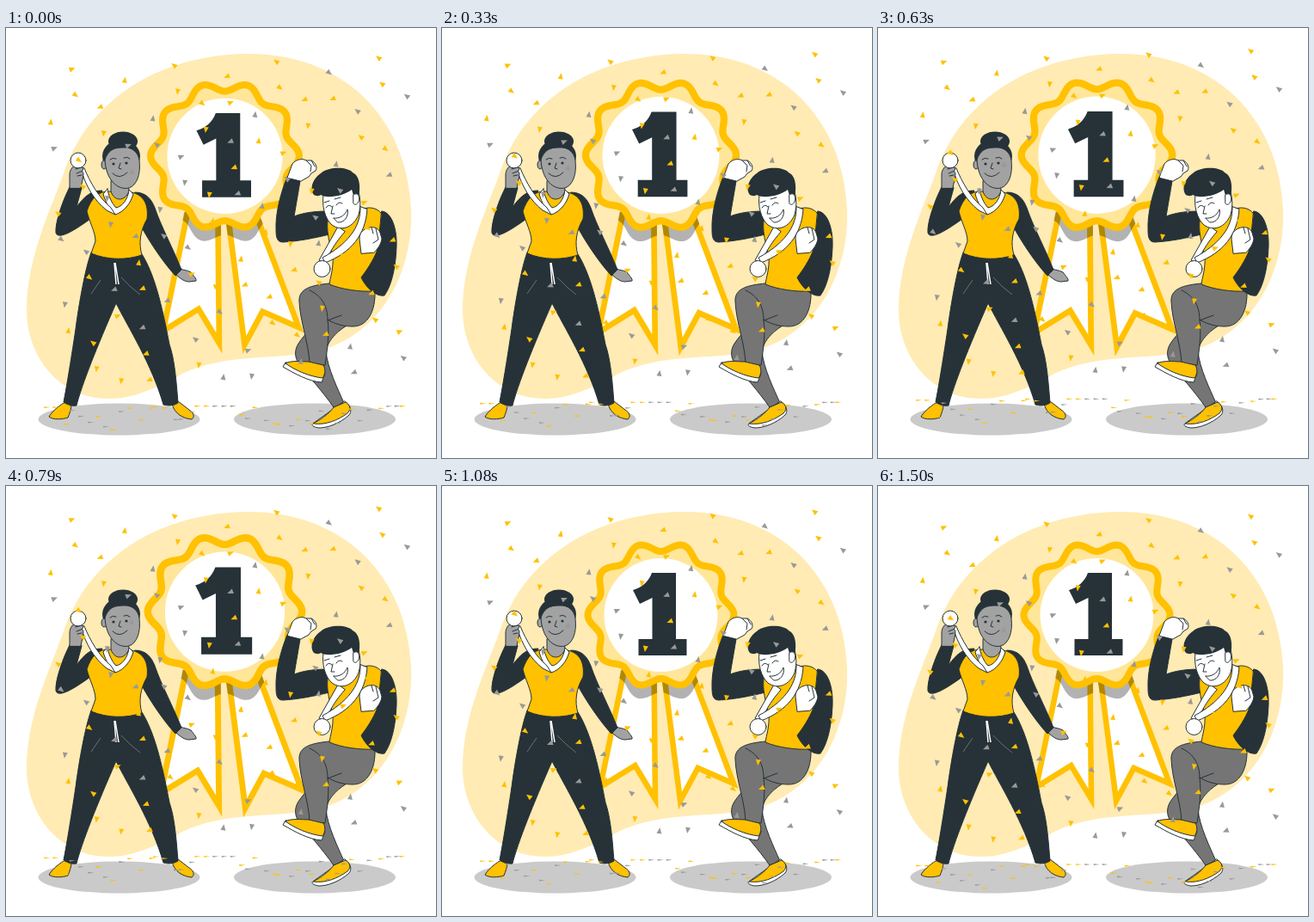
Write an HTML page that moves like this. It is 500 px wide and 500 px high and loops after 1540 ms.

```html
<!DOCTYPE html>
<html lang="en">
<head>
<meta charset="utf-8">
<title>First place</title>
<style>
  html, body { margin: 0; width: 100%; height: 100%; overflow: hidden; background: #fff; }
  svg { display: block; width: 100vw; height: 100vh; }
  .y { fill: #ffc100; }
  .d { fill: #263238; }
  .s { fill: #a2a2a2; }
  .g { fill: #757575; }
  .w { fill: #fff; }
  .o { stroke: #263238; stroke-width: 1; stroke-linejoin: round; stroke-linecap: round; }
  .l { fill: none; }
  .thin { fill: none; stroke: #fff; stroke-width: .5; opacity: .6; }
  .ribbon { fill: #fff; stroke: #ffc100; stroke-width: 6.5; }
  .floor { fill: #cacaca; }
</style>
</head>
<body>
<svg viewBox="0 0 500 500">
  <defs>
    <clipPath id="tails">
      <path d="M208 214L180 358L224 330L251 371L250 214Z M254 214L276 373L299 332L345 350L293 214Z"/>
    </clipPath>
  </defs>

  <path fill="#ffebb3" d="M280 30C390 29 466 102 471 210C474 282 438 356 362 376C315 386 255 378 205 402C175 418 150 431 120 431C60 431 24 380 24 328C24 270 50 215 66 172C84 115 126 72 182 49C214 36 250 30 280 30Z"/>
  <ellipse class="floor" cx="131.500" cy="455" rx="94" ry="18.500"/>
  <ellipse class="floor" cx="359" cy="455" rx="94" ry="18.500"/>

  <g id="badge">
    <path class="ribbon" d="M212 214L184 350L224.500 325L248 364L246.500 214Z"/>
    <path class="ribbon" d="M257.500 214L277 366L297.500 328L339 346L289 214Z"/>
    <g clip-path="url(#tails)"><path id="shade" opacity=".3" transform="translate(0 12)"/></g>
    <path id="rosette" fill="#ffe699" stroke="#ffc100" stroke-width="8"/>
    <circle class="w" cx="254.500" cy="150" r="66"/>
    <path class="d" d="M244 101H272V178H284.500V197H228.500V178H244.500V130L230 137L222 121C232 118 240 112 244 101Z"/>
  </g>

  <g id="woman">
    <path class="y o" d="M67 436C59 441 53 447 50 452C55 456 66 455 72 453C74 448 76 443 76 438Z"/>
    <path class="y o" d="M193 437C196 449 206 454 216 455C220 452 218 447 213 444L200 434Z"/>
    <path class="s o" d="M197 286C203 292 208 295 213 295L221 294C222 292 218 288 215 284C210 281 206 282 203 280Z"/>
    <path class="d o" d="M150 191C163 191 169 199 173 209C180 230 195 258 204 281L197 288C184 274 169 252 159 234Z"/>
    <path class="d o" d="M75 183C66 200 57 226 58 238C60 245 72 241 98 222L112 189C99 189 92 195 82 208L88 186Z"/>
    <path class="d o" d="M99 261C92 280 85 320 81 350C75 390 70 420 67 435C73 439 78 440 82 439C88 415 106 370 128 320C141 346 170 392 183 438C190 440 195 439 200 436C198 410 196 385 190 368C181 320 172 285 158 263Z"/>
    <path class="thin" d="M110 293L99 309M134 290Q145 302 156 310"/>
    <path class="y o" d="M119 190C107 190 99 198 94 213C97 226 104 237 104 248L99 262C118 270 140 270 158 264C154 250 156 236 164 222C166 205 160 194 146 191Z"/>
    <path d="M126 273L128 298M127 273L131 298" stroke="#fff" stroke-width="1.500" fill="none"/>
    <path class="s o" d="M122 178V190C126 202 138 202 143 190L142 176Z"/>
    <path class="w o" d="M118 187L113 193C116 204 122 213 127 217C137 214 145 204 148 193L143 188C142 199 135 208 128 209C123 204 119 195 118 187Z"/>
    <path class="w o" d="M87 164C93 184 102 200 117 212L127 217L122 209C108 197 98 180 91 163Z"/>
    <path class="s o" d="M74 186L74 171C74 164 78 161 82 158C86 157 89 160 87 164L90 169C90 174 88 180 87 186Z"/>
    <circle class="w o" cx="84" cy="154" r="9"/>
    <path class="s o" d="M81 164L88 162C91 162 90 166 87 167L82 169M83 172L88 171"/>
    <ellipse class="d" cx="136" cy="132" rx="17" ry="11.500"/>
    <ellipse class="d" cx="134" cy="149" rx="22" ry="19"/>
    <ellipse class="s o" cx="114" cy="159" rx="3" ry="5"/>
    <path class="s o" d="M115 153C119 142 125 139 136 139C147 138 154 145 155 154C157 170 152 183 143 186C130 189 116 177 115 153Z"/>
    <circle class="d" cx="125" cy="158" r="1.600"/>
    <circle class="d" cx="140" cy="157" r="1.600"/>
    <path class="l o" d="M121 153Q124 150 128 152M137 151Q141 149 144 152M133 157L131 163L134 164M124 169Q132 177 141 168"/>
  </g>

  <g id="man">
    <path class="g o" d="M400 344C388 350 374 362 372 376C374 396 386 420 393 436L381 441C366 420 352 405 343 394C335 384 335 375 340 367C348 355 358 345 370 338Z"/>
    <path class="w o" d="M394 434C402 440 402 446 399 450C388 460 374 465 364 465C356 464 354 461 358 459Z"/>
    <path class="y o" d="M381 441L395 435C401 439 401 444 397 448C386 456 372 462 357 460C367 455 376 448 381 441Z"/>
    <path class="g o" d="M376 297C355 299 340 303 341 318C342 342 352 366 353 390L371 392C374 371 376 356 374 339C382 344 392 347 402 347C421 348 430 328 429 306Z"/>
    <path class="l o" d="M353 305C368 312 374 324 374 340L390 334"/>
    <path class="w o" d="M325 389L322 394C336 402 352 411 367 412L371 402Z"/>
    <path class="y o" d="M325 390C332 386 344 388 352 388L369 392C372 397 371 403 368 407C352 405 336 398 325 390Z"/>
    <path class="d o" d="M327 173C320 190 313 215 314 235C314 245 316 249 322 249C340 248 360 244 376 240L375 213C362 213 348 214 335 219L342 178Z"/>
    <path class="w o" d="M327 174L333 158C337 153 344 151 349 154L355 154C361 157 362 163 360 166L355 169L352 173L343 178Z"/>
    <path class="l o" d="M349 154L355 160L354 167M355 154L359 161"/>
    <path class="y o" d="M378 215C371 222 373 240 380 265C381 280 377 290 376 298C390 304 412 307 428 306C432 285 434 260 440 240C443 220 436 209 422 209Z"/>
    <path class="d o" d="M437 213C449 214 455 235 454 255C453 280 448 300 440 311C430 313 418 301 413 290C420 281 427 270 431 260L434 240Z"/>
    <path class="w o" d="M386 231L364 270L371 273C378 257 386 246 394 237Z"/>
    <path class="w o" d="M412 208C413 232 396 252 368 267L371 273C402 261 418 240 420 211Z"/>
    <circle class="w o" cx="367.500" cy="280" r="9.500"/>
    <path class="w o" d="M413 262L411 245C411 238 415 235 419 233C426 230 433 232 435 238L437 245C436 252 432 257 428 261Z"/>
    <path class="l o" d="M425 232L427 239M430 233L433 246L427 250"/>
    <path class="w o" d="M369 194C367 207 371 222 379 229C390 237 404 232 410 217C413 206 412 195 409 188L390 184Z"/>
    <path class="d" d="M358 194C352 186 358 174 366 169C377 160 398 162 403 168C412 172 413 187 409 201C404 200 404 193 402 188C393 195 374 199 366 194C363 196 360 195 358 194Z"/>
    <path class="w o" d="M404 194C409 190 412 196 410 202C408 206 405 206 404 204Z"/>
    <path class="l o" d="M372 209Q375 204 379 208M384 206Q387 201 391 204M370 203L376 201M382 199L389 197M380 207L378 216L382 216"/>
    <path class="w o" d="M381 221C388 222 394 218 397 211C399 219 393 227 386 226Z"/>
  </g>

  <g id="confetti"></g>
</svg>
<script>
const $ = id => document.getElementById(id);
const FPS = 24, LOOP = 1540, CYCLE = 36, LEAD = 0.6;

function wave(radius, depth, lobes = 10) {
  let d = '';
  for (let a = 0; a < 360; a += 2) {
    const t = a * Math.PI / 180, r = radius + depth * Math.cos(lobes * t);
    d += `${a ? 'L' : 'M'}${(254.5 + r * Math.cos(t)).toFixed(2)} ${(150 + r * Math.sin(t)).toFixed(2)}`;
  }
  return d + 'Z';
}
$('rosette').setAttribute('d', wave(79.5, 5.5));
$('shade').setAttribute('d', wave(83.5, 5.5));

let seed = 7;
const rand = () => (seed = seed * 16807 % 2147483647) / 2147483647;
const frac = v => v % 1;

function piece(x, y, angle, flat) {
  const p = document.createElementNS('http://www.w3.org/2000/svg', 'path');
  p.setAttribute('d', 'M0 -4L3 3L-3 3Z');
  p.setAttribute('fill', rand() < .57 ? '#ffc100' : '#999');
  p.setAttribute('transform', `translate(${x} ${y}) scale(1 ${flat}) rotate(${angle})`);
  $('confetti').append(p);
}

// evenly scattered in the air
for (let i = 1; i <= 105; i++)
  piece(48 + 418 * frac(i * .7549), 34 + 380 * frac(i * .5698), 8 + 60 * Math.floor(rand() * 6), 1);

// settled on the two floor discs and along the line between them
for (let i = 0; i < 44; i++) {
  const x = 47 + 9.6 * (i + rand() * .8);
  const off = Math.min(Math.abs(x - 131.5), Math.abs(x - 359));
  const depth = off < 90 ? Math.sqrt(1 - (off / 90) ** 2) * 30 * rand() : 0;
  piece(x, 440 + depth, 85, .3);
}

// rises to 1 at `at`, falls back to 0
const bump = (p, at, rise, fall) =>
  Math.max(0, 1 - (p < at ? (at - p) / rise : (p - at) / fall));

function draw(ms) {
  const step = Math.floor((ms % LOOP + 5) * FPS / 1000);
  const p = Math.min(1, (step + LEAD) / CYCLE);
  const scale = 1 + .1 * (bump(p, .1, .1, .2) + bump(p, .5, .1, .1));
  const lift = -10 * bump(p, .5, .5, .5);
  $('badge').setAttribute('transform', `translate(254.5 219) scale(${scale}) translate(-254.5 -219)`);
  $('confetti').setAttribute('transform', `translate(0 ${lift})`);
}

const start = performance.now();
function tick() {
  draw(performance.now() - start);
  requestAnimationFrame(tick);
}
tick();
</script>
</body>
</html>
```
